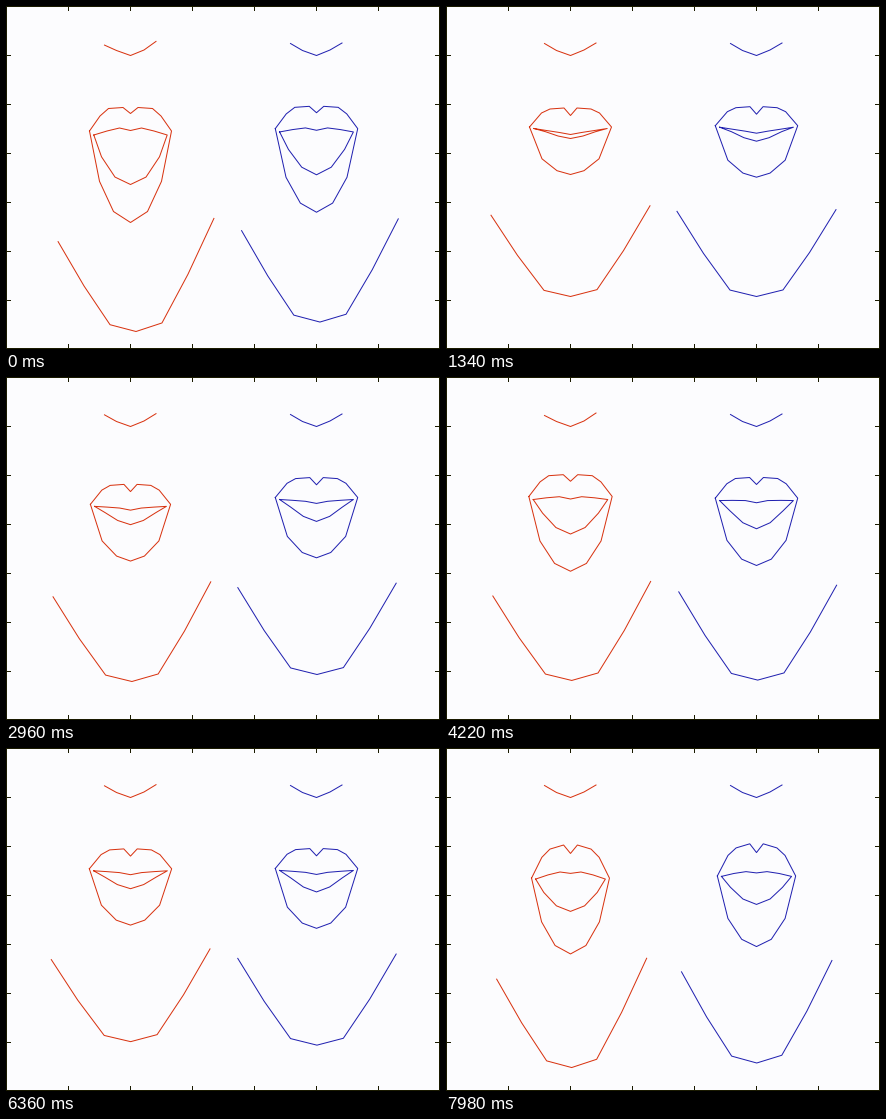
A matplotlib script for the animation above (8000 ms loop, 434 by 343 pixels).

```python
import numpy as np
import matplotlib.pyplot as plt
from matplotlib.animation import FuncAnimation
from matplotlib.collections import LineCollection

W, H, DPI = 434, 343, 128
STEP, LOOP = 20, 8000
PX = 72 / DPI
INK = "#1a1a00"

# ms, red lips open, red jaw open, red mouth shift, blue open, rounding
KEYS = np.array([
    (0, 1, 1, 0, .73, 0),
    (820, .12, .1, 0, .1, 0),
    (1340, 0, 0, 0, 0, 0),
    (2460, .55, .73, 3, .42, 0),
    (2960, .21, .4, 5.5, .2, 0),
    (4220, .62, .37, -4, .36, 0),
    (5100, .29, .31, -1, .28, 0),
    (6360, .2, .09, -1, .19, 0),
    (7200, .05, .06, -.5, .08, 0),
    (7980, .78, .83, 0, .57, 1)])


def controls(t):
    i = min(np.searchsorted(KEYS[:, 0], t, side="right"), len(KEYS) - 1)
    a, b = KEYS[i - 1], KEYS[i]
    u = (t - a[0]) / (b[0] - a[0])
    return (a + (b - a) * u * u * (3 - 2 * u))[1:]


def loop(top, bottom):
    """Close a half outline, given corner to middle, by mirroring it."""
    top, bottom = np.array(top), np.array(bottom)
    flip = np.array([-1, 1])
    return np.vstack([top * flip, top[-2::-1], bottom, bottom[-2::-1] * flip,
                      top[:1] * flip])


def outer_lip(o, r, rest):
    corner, low = 120.5 + 4 * o + 6 * r, 168 + rest + 48 * o
    depth = low - corner
    top = [(41, corner),
           (29 + 1.5 * o, 106.5 + 3 * o),
           (20.5 + 1.5 * o, 102.5 - .5 * o - 1.5 * r),
           (6.5 + o, 101.5 - .5 * o - 4.6 * r),
           (0, 109 - 2 * o - 2.5 * r)]
    bottom = [(28.5 + 2.5 * o, corner + depth * (.67 - .12 * o)),
              (13.5 + 3.5 * o, corner + depth * (.92 - .04 * o)),
              (0, low)]
    return loop(top, bottom)


def inner_lip(o, r, rest):
    corner, low = 122 + 6.5 * o + 3.5 * r, 132 + rest + 46 * o - 5 * r
    depth = low - corner
    top = [(36.7, corner),
           (24 - .5 * o, 124 + .5 * o + 2 * r),
           (11, 126 - 4.5 * o + r),
           (0, 128 - 4 * o)]
    bottom = [(25 + 4 * o, corner + depth * (.32 + .12 * o)),
              (12.5 + 3 * o, corner + depth * (.75 + .1 * o)),
              (0, low)]
    return loop(top, bottom)


def jaw_line(d, r, lean):
    k = np.arange(-3, 4)
    height = np.array([0, 6.5, 43.5, 86])[abs(k)]
    stretch = 1 + .18 * d + np.sign(k) * (lean + .08 * d)
    x = 26.5 * k * (1 - .02 * d - .04 * r) + 5.5 * d ** 1.5 - 3 * r
    return np.column_stack([x, 290 + 35 * d - height * stretch])


def nose(tilt):
    return np.array([(-26, 37 + tilt), (-14, 44), (0, 49),
                     (13.5, 43.5), (25.5, 36.5 - tilt)])


class Face:
    def __init__(self, ax, cx, color, rest, lean):
        self.cx, self.rest, self.lean = cx, rest, lean
        self.lines = [ax.plot([], [], color=color, lw=PX, snap=False)[0]
                      for _ in range(4)]

    def update(self, lips, jaw, shift, r, tilt=0):
        parts = [nose(tilt), jaw_line(jaw, r, self.lean)]
        for lip in (outer_lip, inner_lip):
            p = lip(lips, r, self.rest)
            p[:, 0] *= 1 - .05 * r - .004 * shift
            p[:, 1] += shift
            parts.append(p)
        for line, p in zip(self.lines, parts):
            line.set_data(p[:, 0] + self.cx + .5, p[:, 1] + .5)
        return self.lines


fig = plt.figure(figsize=(W / DPI, H / DPI), dpi=DPI, facecolor="#fcfcfe")
ax = fig.add_axes([0, 0, 1, 1])
ax.set(xlim=(0, W), ylim=(H, 0))
ax.axis("off")

red = Face(ax, 124, "#d8320f", 0, .055)
blue = Face(ax, 310, "#2020b0", 4, .01)

rules = []
for edge in (.5, H - .5):
    rules.append([(0, edge), (W, edge)])
for edge in (.5, W - .5):
    rules.append([(edge, 0), (edge, H)])
for k in range(1, 7):
    x, y = 62 * k + .5, 49 * k + .5
    rules += [[(x, 0), (x, 5)], [(x, H - 5), (x, H)],
              [(0, y), (5, y)], [(W - 5, y), (W, y)]]
frame = LineCollection(rules, colors=INK, linewidths=PX)
frame.set_snap(False)
ax.add_collection(frame)


def draw(i):
    lips, jaw, shift, calm, r = controls(i * STEP)
    return (red.update(lips, jaw, shift, r, tilt=1.6 * lips * (1 - r))
            + blue.update(calm, calm + .13 * r, -1.3, r))


anim = FuncAnimation(fig, draw, frames=LOOP // STEP, interval=STEP,
                     repeat=True, repeat_delay=0, blit=False)
plt.show()
```
